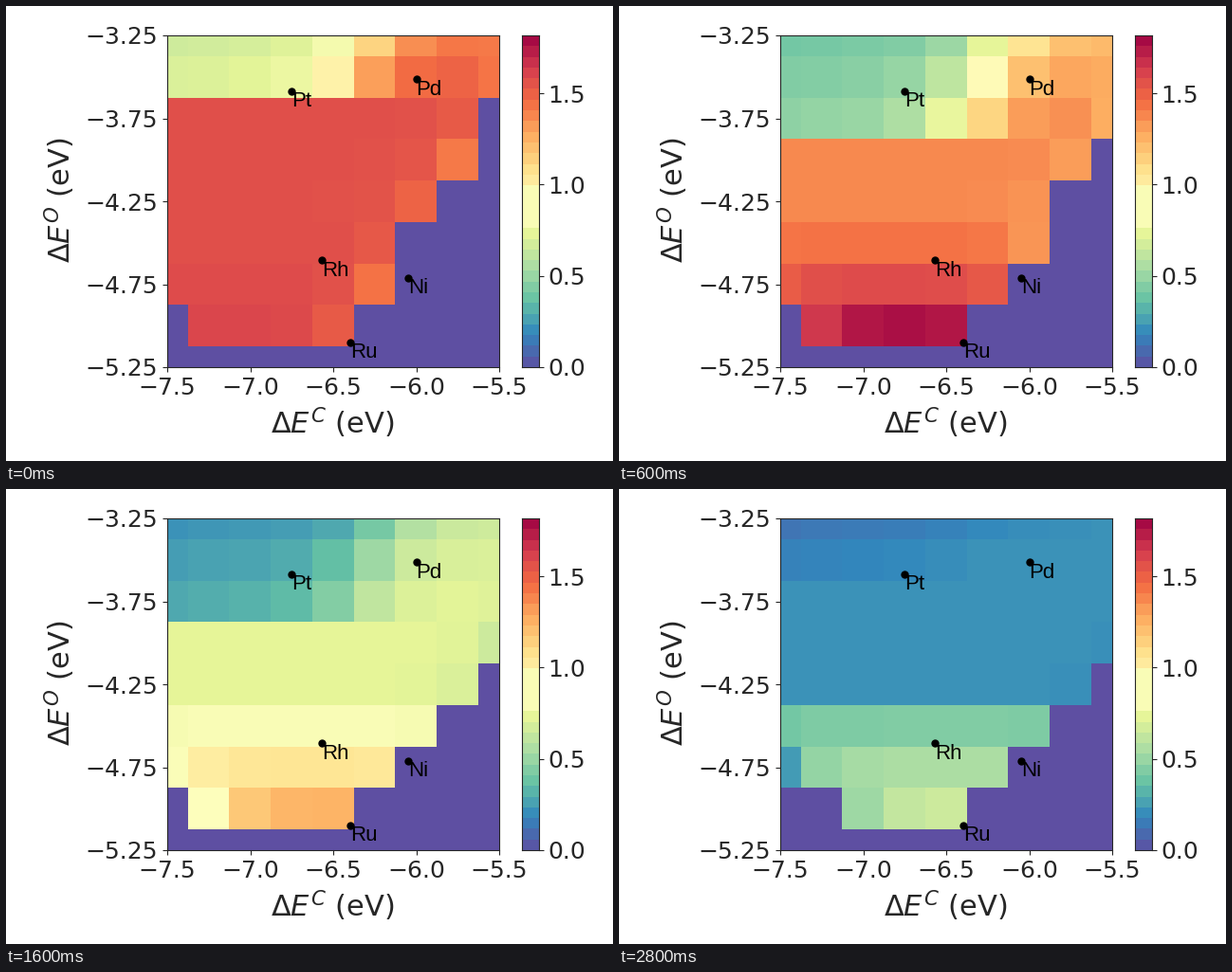
Recreate the animation shown at these times as a matplotlib script. Size 640 by 480 pixels, loop 3 s.

```python
import numpy as np
import matplotlib.pyplot as plt
from matplotlib.animation import FuncAnimation

W, H, DPI = 640, 480, 100
INK = "#262626"
TOP = 1.818          # value at the top of the colour bar
FRAMES, STEP = 15, 200

plt.rcParams.update({
    "font.family": "DejaVu Sans", "font.size": 18,
    "text.color": INK, "axes.edgecolor": INK, "axes.labelcolor": INK,
    "xtick.color": INK, "ytick.color": INK,
})

row, col = np.mgrid[0:9, 0:9]

# Percent of the colour range over time in three zones of the map
TIMES = [0, 2, 4, 6, 8, 10, 14]
UPPER = [36, 24, 20, 14, 12, 8.5, 7]
MIDDLE = [86, 85, 66, 47, 40, 27, 12]
LOWER = [88, 100, 96, 80, 69, 46, 36]


def levels(i):
    upper, middle, lower = (np.interp(i, TIMES, c)
                            for c in (UPPER, MIDDLE, LOWER))

    # Upper rows climb from left to right towards the middle level
    corner = upper + 2 * row + 0.5 * col
    centre = 4.8 + 0.5 * min(i / 2, 1) - 0.4 * row
    climb = (0.85 + 0.075 * row) / (1 + np.exp(-1.8 * (col - centre)))
    depth_of_top = 3 if 0 < i < 10 else 2
    top = corner + (middle - corner) * climb

    # Lower rows drift from the middle level to the lower one
    depth = np.clip((row - 4) / 3, 0, 1) ** (1.9 - 0.09 * i)
    z = np.where(row < depth_of_top, top, middle + (lower - middle) * depth)

    # Fade towards the lower left corner and in newly reached cells
    z = z - 11 * i * np.exp(-1.5 * col - 2.2 * (7 - row))
    age = i - (4 * row + 6 * col - 54)
    z = z - 8 * np.exp(-np.maximum(age, 0) / 3)

    live = (row + col < 12) & (age >= 0) & (row < 8)
    live &= (row < 7) | (10 * col > i)
    return np.where(live, z, 0)


def panel(x, y, w, h):
    return fig.add_axes([x / W, 1 - (y + h) / H, w / W, h / H])


def signed(places):
    return lambda v, _: f"{v:.{places}f}".replace("-", "\u2212")


fig = plt.figure(figsize=(W / DPI, H / DPI), dpi=DPI, facecolor="white")
look = dict(cmap="Spectral_r", vmin=0, vmax=100, aspect="auto",
            interpolation="nearest")

ax = panel(170, 31, 350, 350)
heat = ax.imshow(levels(0), extent=(-7.625, -5.375, -5.375, -3.125), **look)
ax.set(xlim=(-7.5, -5.5), ylim=(-5.25, -3.25))
ax.set_xticks(np.arange(-7.5, -5.4, 0.5))
ax.set_yticks(np.arange(-5.25, -3.2, 0.5))
ax.xaxis.set_major_formatter(signed(1))
ax.yaxis.set_major_formatter(signed(2))

# Banded colour bar with one wide pale band in the middle
bands = (np.arange(31) + 0.5) / 31 * 100
bands[13:17] = 48
bar = panel(544, 31, 18, 350)
bar.imshow(bands[:, None], origin="lower", extent=(0, 1, 0, TOP), **look)
bar.set_xticks([])
bar.set_yticks([0, 0.5, 1, 1.5])
bar.yaxis.tick_right()

for x, y, name in [(-6.75, -3.585, "Pt"), (-6.0, -3.515, "Pd"),
                   (-6.57, -4.607, "Rh"), (-6.05, -4.71, "Ni"),
                   (-6.397, -5.10, "Ru")]:
    ax.plot(x, y, "o", color="black", ms=5)
    ax.annotate(name, (x, y), xytext=(0, -16.5 * 72 / DPI),
                textcoords="offset points", color="black",
                family="Liberation Sans", size=16)

label = dict(size=22, ha="center", va="baseline", rotation_mode="anchor")
fig.text(344.5 / W, 1 - 451 / H, r"$\Delta E^C$ (eV)", **label)
fig.text(68 / W, 1 - 205 / H, r"$\Delta E^O$ (eV)", rotation=90, **label)


def draw(i):
    heat.set_data(levels(i))
    return [heat]


anim = FuncAnimation(fig, draw, frames=FRAMES, interval=STEP,
                     repeat=True, repeat_delay=0, blit=False)
plt.show()
```
